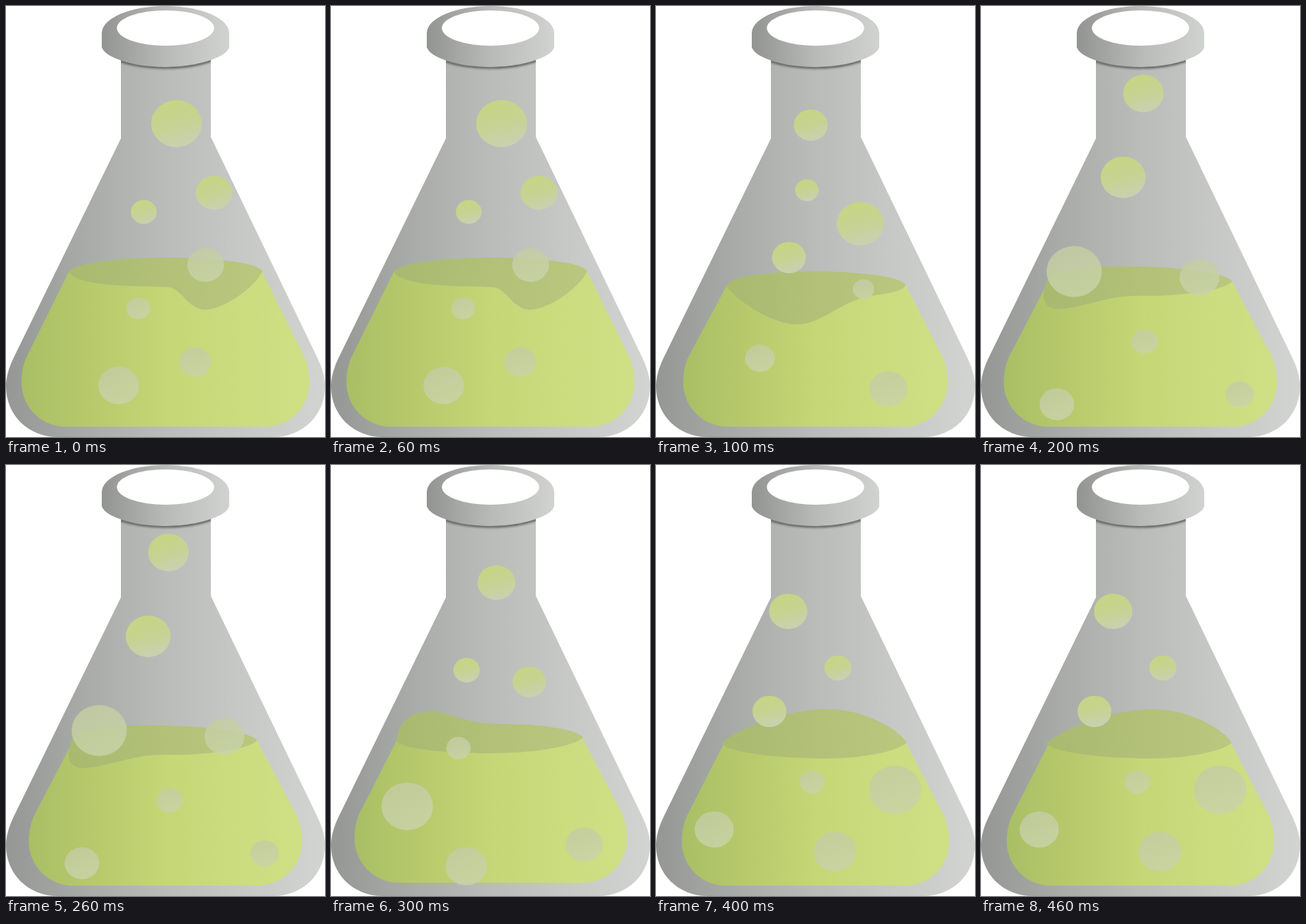
An HTML page that plays this animation: 433x586 px, repeating every 0.5 s.

```html
<!DOCTYPE html>
<html lang="en">
<head>
<meta charset="utf-8">
<title>Bubbling flask</title>
<style>
html, body { margin: 0; height: 100%; overflow: hidden; background: #fff; }
svg { display: block; width: 433px; height: 586px; }
</style>
</head>
<body>
<svg viewBox="0 0 433 586">
  <defs>
    <linearGradient id="glass" gradientUnits="userSpaceOnUse" x1="0" x2="433">
      <stop stop-color="#959795"/><stop offset=".25" stop-color="#a9aba8"/>
      <stop offset=".5" stop-color="#babcb9"/><stop offset=".75" stop-color="#c7c9c6"/>
      <stop offset="1" stop-color="#d2d4d2"/>
    </linearGradient>
    <linearGradient id="rim">
      <stop stop-color="#929492"/><stop offset=".5" stop-color="#b8bab7"/>
      <stop offset="1" stop-color="#d1d3d0"/>
    </linearGradient>
    <linearGradient id="fluid">
      <stop stop-color="#a8bf65"/><stop offset=".2" stop-color="#b6c76b"/>
      <stop offset=".5" stop-color="#c5d677"/><stop offset=".75" stop-color="#cbdc7f"/>
      <stop offset="1" stop-color="#cedf85"/>
    </linearGradient>
    <linearGradient id="top">
      <stop stop-color="#a9b96f"/><stop offset=".5" stop-color="#b2c078"/>
      <stop offset="1" stop-color="#b9c77f"/>
    </linearGradient>
    <linearGradient id="air" x1=".35" y1="0" x2=".65" y2="1">
      <stop stop-color="#c5d583"/><stop offset=".5" stop-color="#c6d392"/>
      <stop offset="1" stop-color="#c9d0b4"/>
    </linearGradient>
    <linearGradient id="wet" x1=".3" y1="0" x2=".7" y2="1">
      <stop stop-color="#c3cca2" stop-opacity=".85"/>
      <stop offset="1" stop-color="#c9d3a8" stop-opacity=".85"/>
    </linearGradient>
    <filter id="soft" x="-10%" y="-100%" width="120%" height="300%">
      <feGaussianBlur stdDeviation="1.4"/>
    </filter>
    <clipPath id="neck"><path d="M156 60H278V110H156Z"/></clipPath>
  </defs>
  <path fill="url(#glass)" d="M156 60V180L10 479Q0 500 0 517C0 556 30 586 70 586H363C403 586 433 556 433 517Q433 500 423 479L278 178V60Z"/>
  <g clip-path="url(#neck)">
    <path d="M150 73C190 87 245 87 284 72" fill="none" stroke="#606260" stroke-width="4" filter="url(#soft)"/>
  </g>
  <path fill="url(#rim)" d="M130 37A86.5 37 0 0 1 303 37V56Q300 66 279 73C245 86 190 86 156 74Q133 66 130 56Z"/>
  <ellipse cx="216.5" cy="30" rx="66" ry="24" fill="#fff"/>
  <path id="liquid" fill="url(#fluid)"/>
  <path id="surface" fill="url(#top)"/>
  <g id="bubbles"></g>
</svg>
<script>
const STEP = 100;

// tank: left lip x, right lip x, lip y, left extent, right extent, floor y
// bubbles: [x, y, radius]
const poses = [
  { tank: [85, 348, 362, 21, 412, 572],
    surface: 'M85 361C95 348 165 342 216 342C290 342 345 350 348 361C335 385 295 413 269 413C245 411 238 382 218 382C160 381 95 380 85 361Z',
    bubbles: [[231.5, 160, 34.5], [282.5, 254, 25], [187, 280, 17.5], [271, 352, 25], [179.5, 411, 16], [257, 484, 21.5], [153, 516, 27.5]] },
  { tank: [96, 339, 380, 37, 396, 572],
    surface: 'M96 379C105 366 160 361 215 361C280 361 335 368 339 380C330 392 300 391 280 397C250 405 220 433 192 433C160 433 115 405 96 382Z',
    bubbles: [[210, 162, 23], [205, 250.5, 16], [277.5, 296, 32], [180.5, 342, 23], [281.5, 385, 14.5], [141, 479, 20], [315.5, 520.5, 26]] },
  { tank: [91, 341, 375, 31, 402, 572],
    surface: 'M91 370C100 358 150 354 190 354C270 354 330 362 341 374C332 386 280 395 210 394C170 394 140 411 103 412C88 411 78 400 91 370Z',
    bubbles: [[220.5, 119, 27.5], [193, 233, 30.5], [126.5, 361, 37.5], [296.5, 369, 27], [222, 456, 17.5], [103, 541.5, 23.5], [351, 528, 19]] },
  { tank: [90, 342, 373, 32, 402, 568],
    surface: 'M89 376C90 350 110 335 135 335C165 336 180 352 225 352C280 352 330 358 342 370C335 381 280 392 217 392C150 392 95 385 89 376Z',
    bubbles: [[224.5, 160, 25.5], [184, 279, 18], [269, 295, 22.5], [173, 385, 16.5], [103.5, 464, 35], [183.5, 545.5, 28], [343.5, 516, 25]] },
  { tank: [92, 340, 379, 35, 398, 572],
    surface: 'M89 378C105 363 170 332 235 332C290 333 335 365 340 378C325 390 280 399 230 399C160 399 95 390 89 378Z',
    bubbles: [[179.5, 199, 26], [247, 276, 18.5], [154, 335, 23], [212, 431, 17], [324.5, 441.5, 35.5], [79, 495.5, 26.5], [243, 525.5, 29]] }
];

const [liquid, surface, bubbles] = ['liquid', 'surface', 'bubbles'].map(id => document.getElementById(id));

function tankPath([left, right, y, x0, x1, floor]) {
  const r = 60, mid = floor - r, bend = mid - 33;
  return `M${left} ${y}L${x0 + 6} ${bend}Q${x0} ${bend + 15} ${x0} ${mid}` +
    `C${x0} ${mid + 33} ${x0 + 27} ${floor} ${x0 + r} ${floor}H${x1 - r}` +
    `C${x1 - 27} ${floor} ${x1} ${mid + 33} ${x1} ${mid}` +
    `Q${x1} ${bend + 15} ${x1 - 6} ${bend}L${right} ${y}Z`;
}

function bubble([x, y, r]) {
  const fill = y < 350 ? 'air' : 'wet';
  return `<ellipse cx="${x}" cy="${y}" rx="${r}" ry="${r * 0.925}" fill="url(#${fill})"/>`;
}

let shown;
function draw(now) {
  const pose = poses[Math.floor(now / STEP) % poses.length];
  if (pose !== shown) {
    shown = pose;
    liquid.setAttribute('d', tankPath(pose.tank));
    surface.setAttribute('d', pose.surface);
    bubbles.innerHTML = pose.bubbles.map(bubble).join('');
  }
}

let start;
function tick(now) {
  start ??= now;
  draw(now - start);
  requestAnimationFrame(tick);
}
draw(0);
requestAnimationFrame(tick);
</script>
</body>
</html>
```
